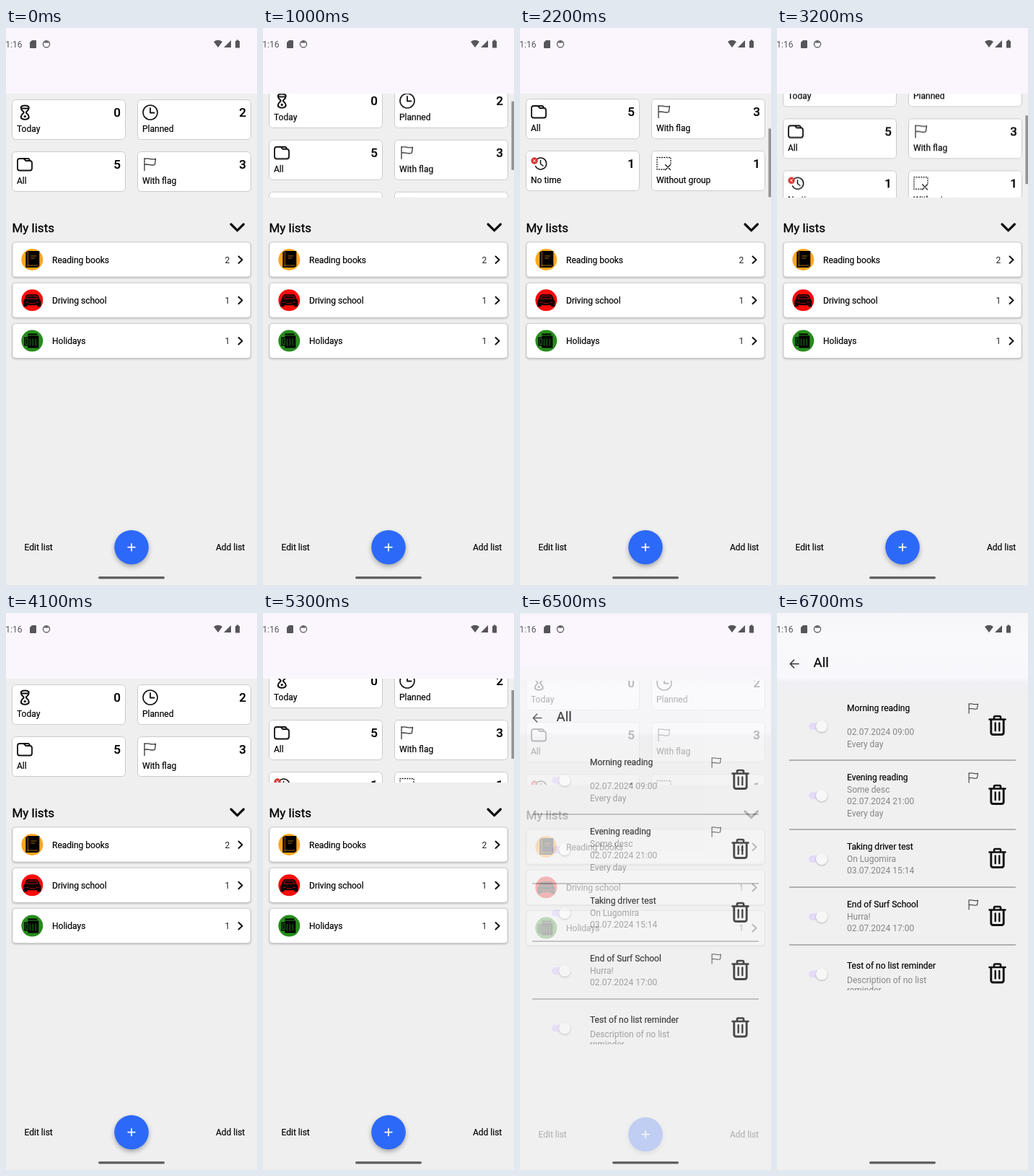
An HTML page that plays this animation: 348 by 772 pixels, repeating every 8 s.

```html
<!DOCTYPE html>
<html lang="en">
<head>
<meta charset="utf-8">
<title>Reminders</title>
<style>
html, body { margin: 0; width: 100%; height: 100%; overflow: hidden; background: #efefef; }
svg { display: block; position: absolute; left: 0; top: 0; }
text { font-family: Roboto, "Liberation Sans", sans-serif; font-size: 12px; fill: #000; stroke: #000; stroke-width: .2px; }
.big { font-size: 17px; stroke-width: .35px; }
.num { font-size: 17px; font-weight: 500; text-anchor: end; }
.count { fill: #222; stroke: none; }
.note { fill: #868686; stroke: none; }
.title { font-size: 18.6px; }
.time { fill: #56555a; stroke: none; }
.line { fill: none; stroke: #111; stroke-width: 1.8; stroke-linecap: round; stroke-linejoin: round; }
.flag { fill: none; stroke: #333; stroke-width: 1.3; stroke-linejoin: round; }
.sys { fill: #56555a; }
.row { filter: drop-shadow(0 1.5px 1.5px rgba(0, 0, 0, .32)); }

#cards, #thumb, #bar, #home, #detail { animation: 8s linear -5ms infinite; }
#cards { animation-name: scroll; }
#thumb { animation-name: thumb; }
#bar { animation-name: bar; }
#home { animation-name: leave; animation-timing-function: step-end; }
#detail { animation-name: enter; animation-timing-function: step-end; }

@keyframes scroll {
  0% { transform: translateY(0); }
  10% { transform: translateY(0); animation-timing-function: steps(9); }
  21.25% { transform: translateY(-73px); }
  36.25% { transform: translateY(-73px); animation-timing-function: steps(8); }
  46.25% { transform: translateY(0); }
  62.5% { transform: translateY(0); animation-timing-function: steps(3); }
  66.25%, 100% { transform: translateY(-23px); }
}
@keyframes thumb {
  0% { transform: translateY(0); }
  10% { transform: translateY(0); animation-timing-function: steps(9); }
  21.25% { transform: translateY(48.4px); }
  36.25% { transform: translateY(48.4px); animation-timing-function: steps(8); }
  46.25% { transform: translateY(0); }
  62.5% { transform: translateY(0); animation-timing-function: steps(3); }
  66.25%, 100% { transform: translateY(15.5px); }
}
@keyframes bar {
  0% { opacity: 0; animation-timing-function: step-end; }
  11.25% { opacity: 1; }
  27.5% { opacity: 1; animation-timing-function: steps(4); }
  32.5% { opacity: 0; animation-timing-function: step-end; }
  37.5% { opacity: 1; animation-timing-function: step-end; }
  48.75% { opacity: .5; animation-timing-function: step-end; }
  51.25% { opacity: 0; animation-timing-function: step-end; }
  63.75% { opacity: 1; }
  71.25% { opacity: 1; animation-timing-function: steps(3); }
  75%, 100% { opacity: 0; }
}
@keyframes leave {
  0% { transform: none; }
  78.75%, 100% { transform: translateY(3px); }
}
@keyframes enter {
  0% { opacity: 0; transform: translateY(386px); }
  78.75% { opacity: .02; transform: translateY(384px); }
  80% { opacity: .35; transform: translateY(190px); }
  81.25% { opacity: .75; transform: translateY(75px); }
  82.5% { opacity: .95; transform: translateY(16px); }
  83.75%, 100% { opacity: 1; transform: none; }
}
</style>
</head>
<body>
<svg id="stage" width="348" height="772" viewBox="0 0 348 772"></svg>
<script>
const at = (x, y, body, extra = '') => `<g transform="translate(${x} ${y})" ${extra}>${body}</g>`;
const text = (x, y, s, cls = '') => `<text x="${x}" y="${y}" class="${cls}">${s}</text>`;
const line = (d, extra = '') => `<path class="line" d="${d}" ${extra}/>`;
const width = w => `style="stroke-width:${w}"`;

// Card icons, drawn in the card's own coordinates
const flag = '<path class="flag" d="M9.5 9V27M9.5 10.5c5-2.5 9 2 15.5-.2l-1.2 8.2c-6 2-9.500-2-14.300 0"/>';
const icons = {
  hourglass: line('M12.500 12.500c-2-5.500 12.500-5.500 10.500 0 0 3-3.700 4-3.700 5.500s3.700 2.500 3.700 5.500c2 5.500-12.500 5.500-10.500 0 0-3 3.700-4 3.700-5.500s-3.700-2.500-3.700-5.500zM13.500 12.500h8.500', width(2)) +
    '<circle cx="17.700" cy="23.500" r="1.600"/>',
  clock: line('M17.500 12v6.500h5.500') + '<circle class="line" cx="17.500" cy="18" r="10" style="stroke-width:1.600"/>',
  folder: line('M7.500 13q0-3 3-3h5.500l3 3h5.500q3 0 3 3v7.500q0 3-3 3h-14q-3 0-3-3zM16 10h6q2 0 2.500 3'),
  flag,
  late: line('M13.500 13.500a8 8 0 1 1-.5 8M20 13.500v5l3.500 2.500', width(1.5)) +
    '<circle cx="11.500" cy="14" r="4.700" fill="#dc3535"/><path d="M9.800 12.300l3.400 3.400m0-3.400l-3.400 3.400" stroke="#fff"/>',
  loose: '<path d="M18 26H7.500V9.500h19V20" fill="none" stroke="#222" stroke-width="1.300" stroke-dasharray="2 1.300"/>' +
    line('M19 19.500l7 7m0-7l-7 7', width(1.3))
};

const cards = [
  ['hourglass', 'Today', 0], ['clock', 'Planned', 2],
  ['folder', 'All', 5], ['flag', 'With flag', 3],
  ['late', 'No time', 1], ['loose', 'Without group', 1]
].map(([icon, name, n], i) => at(8.5 + i % 2 * 174, 99.5 + (i >> 1) * 72,
  '<rect width="157" height="55" rx="5" fill="#fff" stroke="#cbcbcb"/>' +
  at(0, -.5, icons[icon]) + text(6.5, 44.8, name) + text(150.5, 23.800, n, 'num'))).join('');

// List badges, centred on the badge
const book = '<path d="M-9-10l3-2H10V9L7 11H-9z"/><path d="M-6-11V10M-2-5H6M-2-2H4M-7 8H8" stroke="#c98116" stroke-width=".8" fill="none"/>';
const car = '<path d="M-6-8H6q2 0 3 3l1.500 4q1.500 1 1.500 3v7h-5V7H-7v2h-5V2q0-2 1.500-3L-9-5q1-3 3-3z"/>' +
  '<path d="M-7.500-2l1.500-4H6l1.500 4zM-9 3h4M5 3h4M-4 4.500H4" stroke="#c00b0b" fill="none"/>';
const bag = '<path d="M-6-8H7v-2H-6zM-11-5h5v-2H9v17H-6V7h-5z"/><path d="M-9-3h3v8h-3zM-3-3V7M1-3V7M5-3V7" stroke="#1f7d18" fill="none"/>';

const rows = [
  ['Reading books', 2, '#fca720', book],
  ['Driving school', 1, '#f80b0b', car],
  ['Holidays', 1, '#278c1c', bag]
].map(([name, n, color, badge], i) => at(0, i * 56.3,
  '<rect class="row" x="9" y="297" width="330" height="48" rx="4" fill="#fff"/>' +
  '<rect x="9" y="297" width="330" height="48" rx="4" fill="none" stroke="#c8c8c8" stroke-width=".8"/>' +
  at(36.3, 321, `<circle r="15" fill="${color}"/>${badge}`) +
  text(64, 325.5, name) + text(303.5, 325.5, n, 'count') +
  line('M322.500 316.500l5 4.700-5 4.700', width(2)))).join('');

const home = `<g id="home">
  <rect y="-3" width="348" height="780" fill="#efefef"/>
  <rect y="-3" width="348" height="94" fill="#fbf6fe"/>
  <rect y="-3" width="348" height="3" fill="#f3f2f4"/>
  <g clip-path="url(#view)"><g id="cards">${cards}</g></g>
  <g id="bar"><rect id="thumb" x="344.500" y="91" width="3.500" height="95" fill="#929292"/></g>
  ${text(8.5, 283, 'My lists', 'big')}
  ${line('M312 272l8.700 8.700 8.700-8.700', width(3.2))}
  ${rows}
  ${text(25.5, 724.3, 'Edit list')}${text(291, 724.3, 'Add list')}
  <circle cx="174" cy="719.700" r="23.800" fill="#2d69f8" style="filter:drop-shadow(0 3px 3px rgba(0,0,0,.3))"/>
  <path d="M168.500 719.700h11M174 714.200v11" stroke="#fff" stroke-width="1.700"/>
</g>`;

const trash = line('M-11-8.500H11M-4.500-9v-2.500q0-1.500 1.500-1.500h6q1.500 0 1.500 1.500V-9', width(2.7)) +
  line('M-8.700-8V9.500q0 3 3 3H5.700q3 0 3-3V-8', width(2.9)) + line('M-2.800-3.500V7M2.800-3.500V7', width(2.4));
const toggle = '<rect x="44" y="-5" width="26" height="10" rx="5" fill="#e3dbf8"/>' +
  '<circle cx="62" r="8" fill="#f8f7f8" style="filter:drop-shadow(0 1px 1px rgba(0,0,0,.25))"/>';

// Title centre, button centre, flagged, lines, line offsets
const pitch = [0, 16.5, 33, 49.5];
const items = [
  [132, 156, 1, ['Morning reading', '', '02.07.2024 09:00', 'Every day']],
  [228, 252, 1, ['Evening reading', 'Some desc', '02.07.2024 21:00', 'Every day']],
  [324, 340, 0, ['Taking driver test', 'On Lugomira', '03.07.2024 15:14']],
  [404, 420, 1, ['End of Surf School', 'Hurra!', '02.07.2024 17:00']],
  [489, 499.5, 0, ['Test of no list reminder', 'Description of no list', 'reminder'], [0, 19.700, 33.500]]
].map(([y, mid, marked, lines, gaps = pitch]) =>
  lines.map((s, i) => text(97, y + gaps[i] + 4.3, s, i ? 'note' : '')).join('') +
  at(0, mid + 1, toggle) + at(305.5, mid, trash) +
  (marked ? at(258.5, y - 14, `<g transform="scale(.8)">${flag}</g>`) : '')).join('');

const rules = [204, 300, 380, 460].map(y => `<path d="M17 ${y}H331" stroke="#b1b1b1" stroke-width="1.800"/>`).join('');

const detail = `<g id="detail">
  <rect width="348" height="772" fill="#f0f0f0"/>
  <rect width="348" height="120" fill="url(#top)"/>
  ${line('M30 70.500H18.500M23.700 65l-5.500 5.500 5.500 5.500', 'style="stroke-width:1.500;stroke:#333"')}
  ${text(50.5, 75, 'All', 'title')}
  <g clip-path="url(#list)">${items}</g>${rules}
</g>`;

const system = `${text(-.7, 26.5, '1:16', 'time')}
  <g class="sys">
    <path d="M36 17h5q1 0 1 1v9q0 1-1 1h-7q-1 0-1-1v-7z"/>
    <path d="M288 19q6-4.500 12 0l-6 8z"/><path d="M312 17v10h-10z"/>
    <path d="M318 18h1.500v-1.500h3V18h1.500v9.500h-6z"/>
  </g>
  <circle cx="56" cy="22.300" r="4.600" fill="none" stroke="#56555a" stroke-width="1.200"/>
  <path d="M52 20.500q4-5 8 0z" fill="#56555a"/>
  <rect x="128" y="760.200" width="92" height="3.200" rx="1.600" fill="#5c5c5c"/>`;

document.getElementById('stage').innerHTML = `<defs>
  <clipPath id="view"><rect y="91" width="348" height="144"/></clipPath>
  <clipPath id="list"><rect y="91" width="348" height="432"/></clipPath>
  <linearGradient id="top" x2="0" y2="1">
    <stop stop-color="#f6f5f7"/><stop offset=".3" stop-color="#f9f8fb"/>
    <stop offset=".75" stop-color="#f8f7fb"/><stop offset=".8" stop-color="#f0eff4"/>
    <stop offset="1" stop-color="#f0f0f0"/>
  </linearGradient></defs>${home}${detail}${system}`;
</script>
</body>
</html>
```
